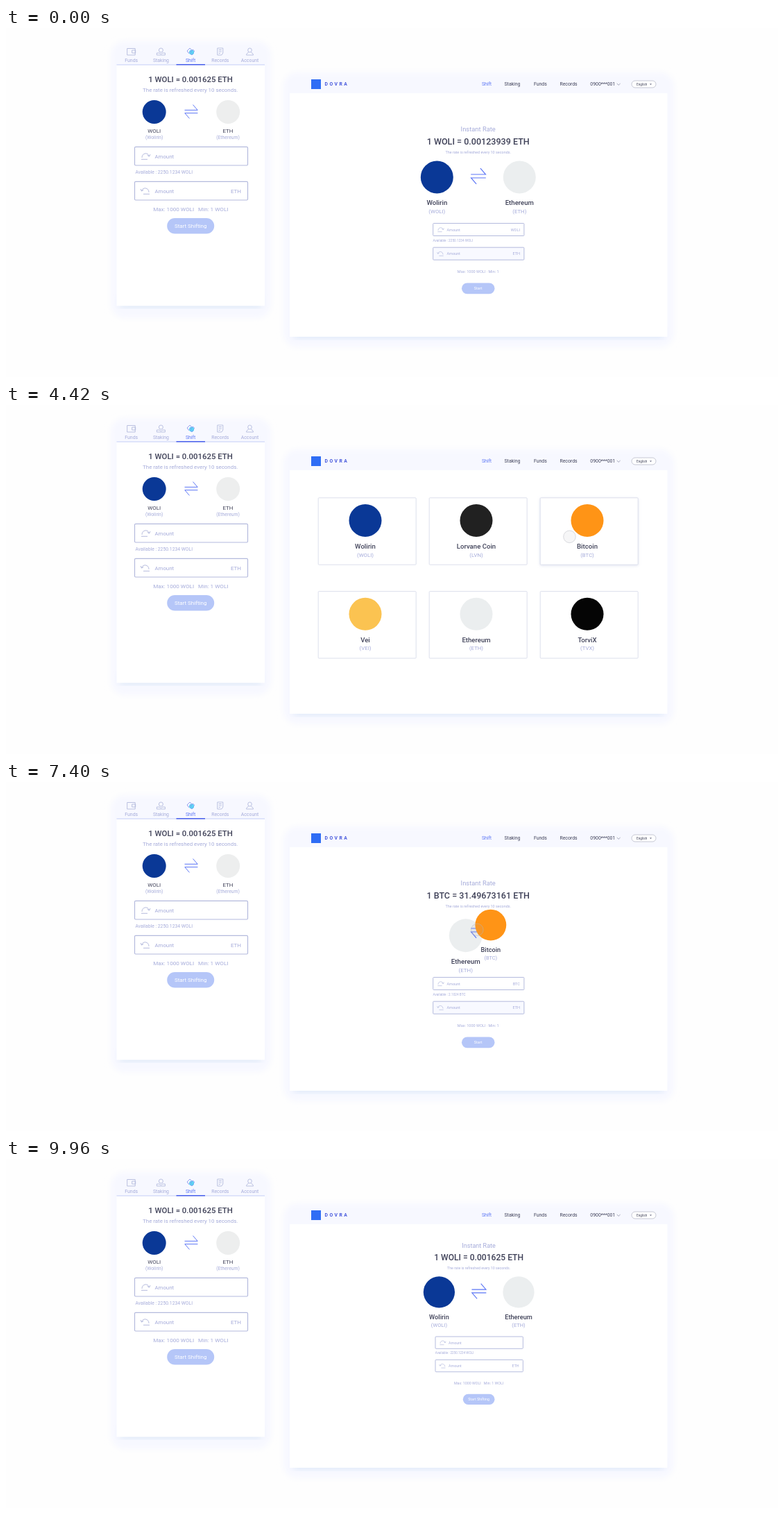
An HTML page that plays this animation: 1113x503 px, repeating every 10000 ms.

```html
<!DOCTYPE html>
<html lang="en">
<head>
<meta charset="utf-8">
<title>Shift</title>
<style>
html, body { margin: 0; width: 100%; height: 100%; overflow: hidden; background: #fefefe; }
svg { display: block; width: 100vw; height: 100vh; font-family: Roboto, Arial, sans-serif; }
text { white-space: pre; }
</style>
</head>
<body>
<svg viewBox="0 0 1113 503">
  <defs>
    <filter id="soft" x="-10%" y="-10%" width="120%" height="120%"><feGaussianBlur stdDeviation="4"/></filter>
    <filter id="lift" x="-10%" y="-10%" width="120%" height="130%"><feGaussianBlur stdDeviation="2"/></filter>
  </defs>
  <g id="base"></g>
  <g id="live"></g>
</svg>
<script>
const DARK = '#3f4158', PALE = '#a5abda', BLUE = '#5b75f5', FRAME = '#f7f8ff', EDGE = '#b4badd', BUTTON = '#b5c6f8';
const MID = 680.7;
const $ = id => document.getElementById(id);

const coins = {
  woli: ['Wolirin', 'WOLI', '#0a3896'],
  lvn: ['Lorvane Coin', 'LVN', '#212121'],
  btc: ['Bitcoin', 'BTC', '#ff9416'],
  vei: ['Vei', 'VEI', '#fbc351'],
  eth: ['Ethereum', 'ETH', '#ebeeef'],
  tvx: ['TorviX', 'TVX', '#050505'],
};

// Easing
const clamp = u => Math.min(1, Math.max(0, u));
const ramp = (t, a, b) => clamp((t - a) / (b - a));
const easeOut = u => 1 - (1 - u) ** 3;
const easeIn = u => u ** 3;
const easeInOut = u => u < .5 ? 4 * u ** 3 : 1 - 4 * (1 - u) ** 3;

// Drawing; text is placed by the middle of its capitals
const text = (x, y, size, str, fill = PALE, anchor = 'middle', weight = 400, more = '') =>
  `<text x="${x}" y="${y + size * .355}" font-size="${size}" fill="${fill}" text-anchor="${anchor}" font-weight="${weight}" ${more}>${str}</text>`;
const rect = (x, y, w, h, r, fill = 'none', stroke = 'none', more = '') =>
  `<rect x="${x}" y="${y}" width="${w}" height="${h}" rx="${r}" fill="${fill}" stroke="${stroke}" ${more}/>`;
const disc = (x, y, r, fill, more = '') => `<circle cx="${x}" cy="${y}" r="${r}" fill="${fill}" ${more}/>`;
const line = (d, stroke, width = 1) => `<path d="${d}" fill="none" stroke="${stroke}" stroke-width="${width}"/>`;
const group = (body, transform = '', opacity = 1) =>
  opacity > 0 ? `<g transform="${transform}" opacity="${opacity}">${body}</g>` : '';
const at = (x, y, sx = 1, sy = sx) => `translate(${x} ${y}) scale(${sx} ${sy})`;

const arrows = (x, y, s) => group(line('M-10.5-2.4H10.2L2.8-11M10.5 2.4H-10.2L-2.8 11', BLUE, 1.1), at(x, y, s));
const turn = (x, y, s, flip) =>
  group(line('M-6 4.5H3M-5 2C-5-5 4-6 5.5 0M2.7-1.5L5.5.3 7-2.7', EDGE), at(x, y, flip ? -s : s, s));

function phone() {
  const icons = [
    'M-6-4.5H5.5V5H-6ZM1-2H6V2H1Z',
    'M-3-2A3 3 0 1 1 3-2 3 3 0 1 1-3-2M-6 5V2H-2.5L0 3.5 2.5 2H6V5Z',
    'M-5-1L-1-5 1.5-2.5-2.5 2.5ZM0 3L3-3 5.5-1 2 5Z',
    'M-4-5H4V2L2 5H-4ZM-2-2.5H2M-2 0H2M-2 2.5H0',
    'M-2.8-2A2.8 3 0 1 1 2.8-2 2.8 3 0 1 1-2.8-2M-5 5C-5 2-2 2-1.5.7M5 5C5 2 2 2 1.5.7M-5 5H5',
  ];
  const tabs = ['Funds', 'Staking', 'Shift', 'Records', 'Account'].map((name, i) => {
    const x = 180.7 + i * 42.7, on = i == 2;
    return (on ? disc(x + 1.5, 35, 3.5, '#4fe3f5') : '') +
      group(line(icons[i], on ? '#8794ee' : EDGE, .9), at(x, 34)) +
      text(x, 46.5, 6.9, name, on ? BLUE : PALE);
  }).join('');
  const field = (y, flip) => rect(185.5, y, 163, 26.7, 1.5, '#fff', EDGE, 'stroke-width="1.2"') +
    turn(201, y + 13.5, 1, flip) + text(214.5, y + 13.6, 7.8, 'Amount', PALE, 'start');
  return rect(151, 19, 231, 399, 20, FRAME, 'none', 'filter="url(#soft)"') +
    rect(164, 385, 204, 18, 3, '#dfe9f8', 'none', 'filter="url(#soft)"') +
    rect(159.5, 53, 213.5, 347.5, 0, '#fff') + tabs +
    line('M159.5 53H373', '#c3cdf6') + line('M245.5 52.7H287', '#4c63ec', 1.5) +
    text(266, 74, 11.4, '1 WOLI = 0.001625 ETH', DARK, 'middle', 500) +
    text(265.7, 89.5, 7.9, 'The rate is refreshed every 10 seconds.') +
    disc(213.7, 121, 17, coins.woli[2]) + disc(320.2, 121, 17, '#edeeee') + arrows(267, 120.5, .9) +
    text(213.7, 148, 7.9, 'WOLI', DARK) + text(320, 148, 7.9, 'ETH', DARK) +
    text(213.7, 158, 6.8, '(Wolirin)') + text(320, 158, 6.8, '(Ethereum)') +
    field(171.3) + text(186.5, 207.5, 6.8, 'Available : 2250.1234 WOLI', PALE, 'start') +
    field(221.3, true) + text(339, 235, 8, 'ETH', PALE, 'end') +
    text(266.3, 261.5, 8.1, 'Max: 1000 WOLI   Min: 1 WOLI') +
    rect(232.2, 274, 68, 22.6, 11.3, BUTTON) + text(266.2, 285.3, 8, 'Start Shifting', '#fff');
}

function desktop() {
  const nav = [['Shift', 693], ['Staking', 730], ['Funds', 770.3], ['Records', 811], ['0900***001', 860.3]];
  return rect(400, 64, 563, 396, 20, FRAME, 'none', 'filter="url(#soft)"') +
    rect(415, 430, 533, 18, 3, '#e2ebfa', 'none', 'filter="url(#soft)"') +
    rect(409, 94, 544.5, 351, 0, '#fff') +
    rect(440, 74, 14, 14, 0, '#2f6df5') +
    text(459.5, 81, 6.8, 'DOVRA', '#4456dc', 'start', 700, 'letter-spacing="2.5"') +
    nav.map(([name, x], i) => text(x, 81, 6.9, name, i ? DARK : BLUE)).join('') +
    line('M880.8 80L883.2 82.3 885.6 80', '#8c8fa5', .8) +
    rect(902, 76, 35, 10, 5, '#fff', '#b9bbc9', 'stroke-width=".8"') +
    text(916.7, 81, 4.7, 'English', DARK) + '<path d="M928 80.2h3l-1.5 2z" fill="#777a90"/>';
}

// A coin with its name and ticker, around the disc's centre
const coin = (key, x, y, s = 1, hover = 1) => {
  const [name, sym, fill] = coins[key];
  return group(disc(0, 0, 23.5 * hover, fill) + text(0, 37, 9.6, name, DARK, 'middle', 500) +
    text(0, 49.3, 7.8, `(${sym})`), at(x, y, s));
};

function rateView({ from, to, rate, have, last }, pair) {
  const a = coins[from][1], b = coins[to][1];
  const field = (y, sym, flip) => rect(615.7, y, 131.2, 18, 1, flip && !last ? '#f8f9ff' : '#fff', EDGE) +
    turn(626.5, y + 9, .7, flip) + text(635.5, y + 9.1, 5.5, 'Amount', PALE, 'start') +
    text(741, y + 9.1, 5.6, sym, PALE, 'end');
  return text(MID, 145.5, 9.4, 'Instant Rate') +
    text(MID, 163.2, 12.55, `1 ${a} = ${rate} ${b}`, DARK, 'middle', 500) +
    text(MID, 178.6, 5.45, 'The rate is refreshed every 10 seconds.') +
    pair +
    field(281.5, last ? '' : a) + text(615.5, 306.2, 4.75, `Available : ${have} ${a}`, PALE, 'start') +
    field(316.2, b, true) +
    text(MID, 351.2, 5.55, last ? 'Max: 1000 WOLI   Min: 1 WOLI' : 'Max: 1000 WOLI · Min: 1') +
    rect(657, 367.5, 47.5, 15.7, 7.85, BUTTON) + text(MID, 375.5, 5.5, last ? 'Start Shifting' : 'Start', '#fff');
}

// Cards spread from one point; p runs from gathered to spread.
// The middle card lies on top in the first row and below in the second.
function grid(p, picked) {
  const keys = Object.keys(coins);
  return [0, 2, 1, 4, 3, 5].map(i => {
    const x = MID + (i % 3 - 1) * 160 * p, y = 228.4 + ((i < 3 ? 182 : 316.8) - 228.4) * p;
    const box = [x - 70.5, y - 48.2, 141, 96.4, 1];
    const shadow = keys[i] == picked ? rect(...box, '#dcdfee', 'none', 'filter="url(#lift)" transform="translate(0 1)"') : '';
    return group(shadow + rect(...box, '#fff', '#dcdfec') + coin(keys[i], x - 2.7, y - 15.5), '', p);
  }).join('');
}

const tooltip = opacity => group(
  `<path d="M584 171H659.5Q661 171 661 172.5V185Q661 186.3 659.5 186.3H625L621.7 190 618.4 186.3H584Q582.6 186.3 582.6 185V172.5Q582.6 171 584 171Z" fill="#5f78f8"/>` +
  text(621.5, 178.6, 4.65, 'Click here to select currency.', '#fff'), '', opacity);

// Pointer moves: start, end, x, y
const moves = [
  [340, 1300, 638.5, 216], [3400, 4340, 812.5, 189.8], [4800, 5900, 679.3, 213],
  [7600, 8180, 608.7, 214], [8700, 9360, 530, 176],
];
const clicks = [2320, 6170, 8340];

function pointer(t) {
  let x = 930, y = 118;
  for (const [a, b, px, py] of moves) {
    const u = easeInOut(ramp(t, a, b));
    x += (px - x) * u;
    y += (py - y) * u;
  }
  const press = Math.max(...clicks.map(c => 1 - Math.abs(t - c) / 150), 0);
  return group(disc(x, y, 8.8 - .4 * press, '#aeb0b8', `fill-opacity="${.11 + .28 * press}" stroke="#b4b5bd" stroke-width=".6" stroke-opacity=".8"`),
    '', ramp(t, 340, 460) * (1 - ramp(t, 9480, 9640)));
}

const views = [
  { from: 'woli', to: 'eth', rate: '0.00123939', have: '2250.1234' },
  { from: 'btc', to: 'eth', rate: '31.49673161', have: '2.1024' },
  { from: 'eth', to: 'btc', rate: '0.03174932', have: '2.1024' },
  { from: 'woli', to: 'eth', rate: '0.001625', have: '2250.1234', last: true },
];

function pairAt(t, view) {
  const swapping = t > 4000 && t < 9000;
  const p = swapping ? easeInOut(ramp(t, 6900, 7800)) : 0, bow = Math.sin(Math.PI * p);
  const hover = 1 + .045 * (swapping ? ramp(t, 8060, 8180) : ramp(t, 1180, 1300) * (t < 4000));
  const [left, right] = swapping ? ['btc', 'eth'] : [view.from, view.to];
  return coin(right, 740.3 - 119 * p, 215 + 7 * bow, 1 + .02 * bow, swapping ? hover : 1) +
    arrows(MID + .3, 213.5, 1.03) +
    coin(left, 621.3 + 119 * p, 215 - 10 * bow, 1 - .05 * bow, swapping ? 1 : hover);
}

function draw(t) {
  const view = views[t < 4000 ? 0 : t < 7430 ? 1 : t < 9000 ? 2 : 3];
  const open = t < 4000 ? easeOut(ramp(t, 2400, 3010)) : easeOut(ramp(t, 8420, 9030));
  const close = t < 8000 ? easeIn(ramp(t, 4440, 4860)) : easeIn(ramp(t, 9420, 9740));
  const spread = t < 4000 ? open : t < 8000 ? 1 - close : open * (1 - close);
  const shown = t < 4000 ? 1 - ramp(t, 2380, 2500)
    : t < 8000 ? ramp(t, 4780, 5080)
    : t < 9000 ? 1 - ramp(t, 8400, 8520) : ramp(t, 9680, 9940);
  const place = view.last ? 'translate(26.1 -15.1) scale(.963)' : '';
  const tip = ramp(t, 1180, 1320) * (1 - ramp(t, 2380, 2460));
  $('live').innerHTML = group(rateView(view, pairAt(t, view)), place, shown) +
    grid(spread, t >= 4410 && t < 4900 ? 'btc' : '') + tooltip(tip) + pointer(t);
}

$('base').innerHTML = phone() + desktop();
const start = performance.now();
function tick() {
  draw((performance.now() - start) % 10000);
  requestAnimationFrame(tick);
}
tick();
</script>
</body>
</html>
```
